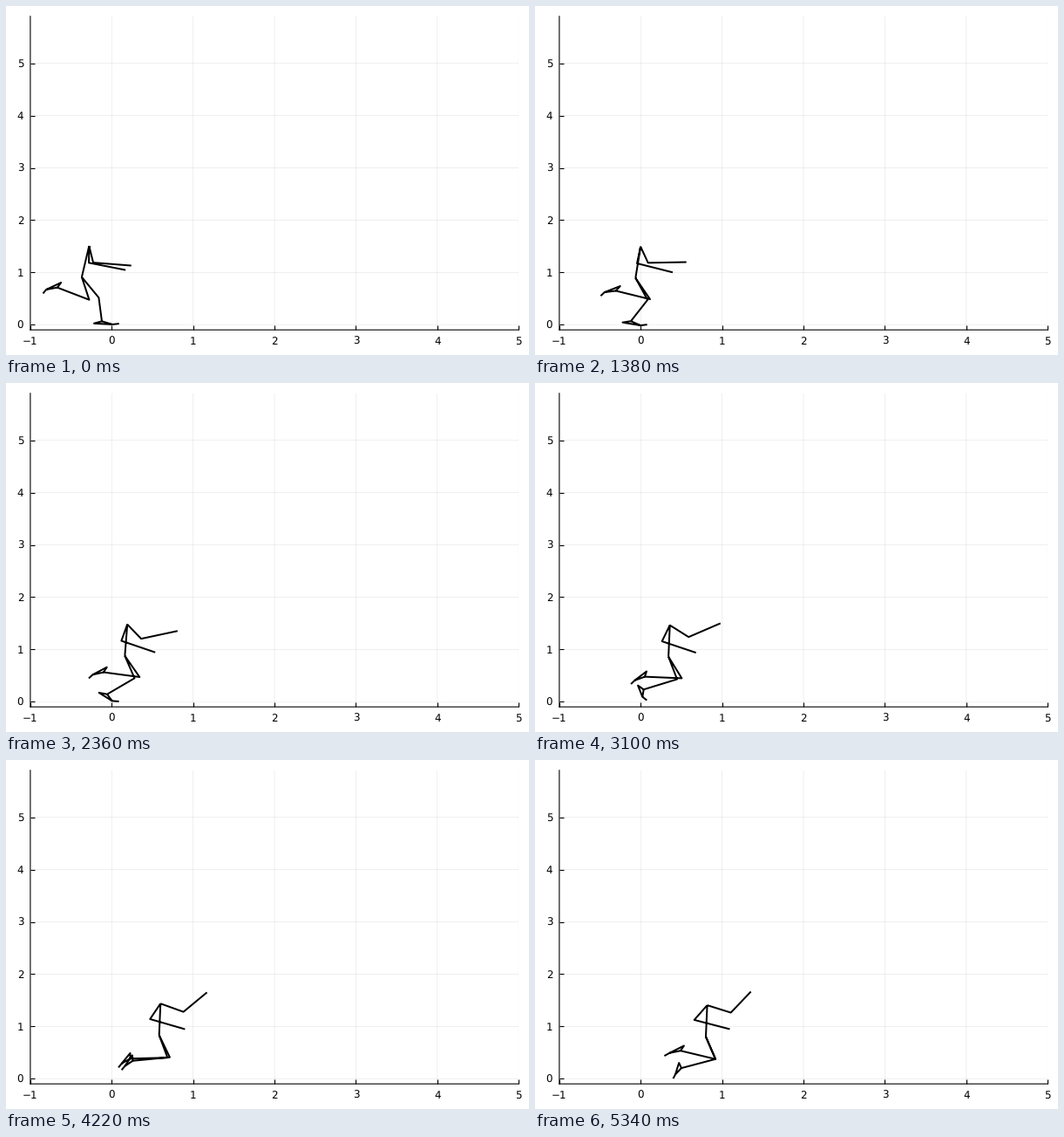
Recreate the animation shown at these times as a matplotlib script. Size 600 px wide and 400 px high, loop 5540 ms.

```python
import matplotlib.pyplot as plt
import numpy as np
from matplotlib.animation import FuncAnimation

plt.rcParams["font.family"] = "DejaVu Sans"
plt.rcParams["text.hinting"] = "no_hinting"
W, H, DPI = 600, 400, 100
LEFT, RIGHT, TOP, BOTTOM = 27.9, 588.2, 11.8, 371.2
LAST_STEP = 115
TICK_MS, TICKS = 20, 277

# Segment lengths
TORSO, THIGH = 0.603, 0.444
HEEL, SOLE, TOE = 0.105, 0.226, 0.084
UPPER_ARM, FOREARM = 0.323, 0.471
HEEL_ANGLE = 28
GAP = np.full(2, np.nan)


def poly(u, *coeffs):
    """Polynomial in u, constant term first."""
    return sum(c * u**n for n, c in enumerate(coeffs))


def ease(u, start, end):
    v = np.clip((u - start) / (end - start), 0, 1)
    return v * v * (3 - 2 * v)


def polar(length, degrees):
    t = np.radians(degrees)
    return length * np.array([np.cos(t), np.sin(t)])


def leg(hip, thigh, ankle, sole, toe):
    knee = hip + polar(THIGH, thigh)
    heel = ankle - polar(HEEL, sole + HEEL_ANGLE)
    ball = heel + polar(SOLE, sole)
    tip = ball + polar(TOE, toe)
    return [hip, knee, ankle, heel, ball, tip, GAP, ankle, ball, GAP]


def arm(shoulder, upper, fore):
    elbow = shoulder + polar(UPPER_ARM, upper)
    return [shoulder, elbow, elbow + polar(FOREARM, fore), GAP]


def pose(u):
    """Stick figure at stride progress u in 0..1, limbs split by gaps."""
    hip = np.array([poly(u, -.368, 1.168, .2, -.2),
                    poly(u, .91, -.055, -.053)])
    shoulder = hip + polar(TORSO, 81.4 + 7 * ease(u, 0, .6))
    stance_ankle = np.array([poly(u, -.121, -.205, .815),
                             poly(u, .065, -.285, 1.3, -.546)])
    swing_ankle = np.array([poly(u, -.668, 1.687, -1.147, .628),
                            poly(u, .71, -.096, -.675, .263)])
    stance = leg(hip, poly(u, -62, -41, 28.5), stance_ankle,
                 sole=-5 - 138 * ease(u, .1, 1.05),
                 toe=10 - 149 * ease(u, .3, .95))
    swing = leg(hip, poly(u, -78.1, 81.6, -158, 80), swing_ankle,
                sole=poly(u, -143.8, -67.5, 221, -111),
                toe=poly(u, -118, -35, 44))
    front = arm(shoulder, -81 + 55 * ease(u, .05, .92),
                -7 + 65.5 * ease(u, .04, .97))
    back = arm(shoulder, -90.5 - 29 * u,
               -17 - 11 * ease(u, .1, .45) + 6 * ease(u, .5, 1))
    return np.array([hip, shoulder, GAP] + stance + swing + front + back).T


def step_at(tick):
    """Each 140 ms holds three steps, for 20, 100 and 20 ms."""
    cycle, part = divmod(tick, 7)
    return min(3 * cycle + (part > 0) + (part > 5), LAST_STEP)


def px(pixels):
    return pixels * 72 / DPI


fig = plt.figure(figsize=(W / DPI, H / DPI), dpi=DPI, facecolor="white")
ax = fig.add_axes([LEFT / W, 1 - BOTTOM / H,
                   (RIGHT - LEFT) / W, (BOTTOM - TOP) / H])
ax.set(xlim=(-1, 5), ylim=(-0.1, 5.9), xticks=range(-1, 6), yticks=range(6))
ax.set_axisbelow(True)
ax.grid(color="black", alpha=0.1, linewidth=px(0.6))
ax.spines[["top", "right"]].set_visible(False)
ax.spines[["left", "bottom"]].set_linewidth(px(1.1))
ax.tick_params(direction="in", length=px(5), width=px(1.1), labelsize=8.6)
ax.tick_params(axis="x", pad=px(7.2))
ax.tick_params(axis="y", pad=px(7.7))

# Keep thin lines at their true subpixel positions
for spine in ax.spines.values():
    spine.set_snap(False)
for tick in ax.xaxis.get_major_ticks() + ax.yaxis.get_major_ticks():
    tick.tick1line.set_snap(False)
    tick.gridline.set_snap(False)

body, = ax.plot([], [], color="black", linewidth=px(2),
                solid_joinstyle="round", solid_capstyle="butt",
                clip_on=False)


def update(tick):
    body.set_data(*pose(step_at(tick) / LAST_STEP))
    return body,


anim = FuncAnimation(fig, update, frames=TICKS, interval=TICK_MS,
                     repeat=True, repeat_delay=0, blit=False)
plt.show()
```
